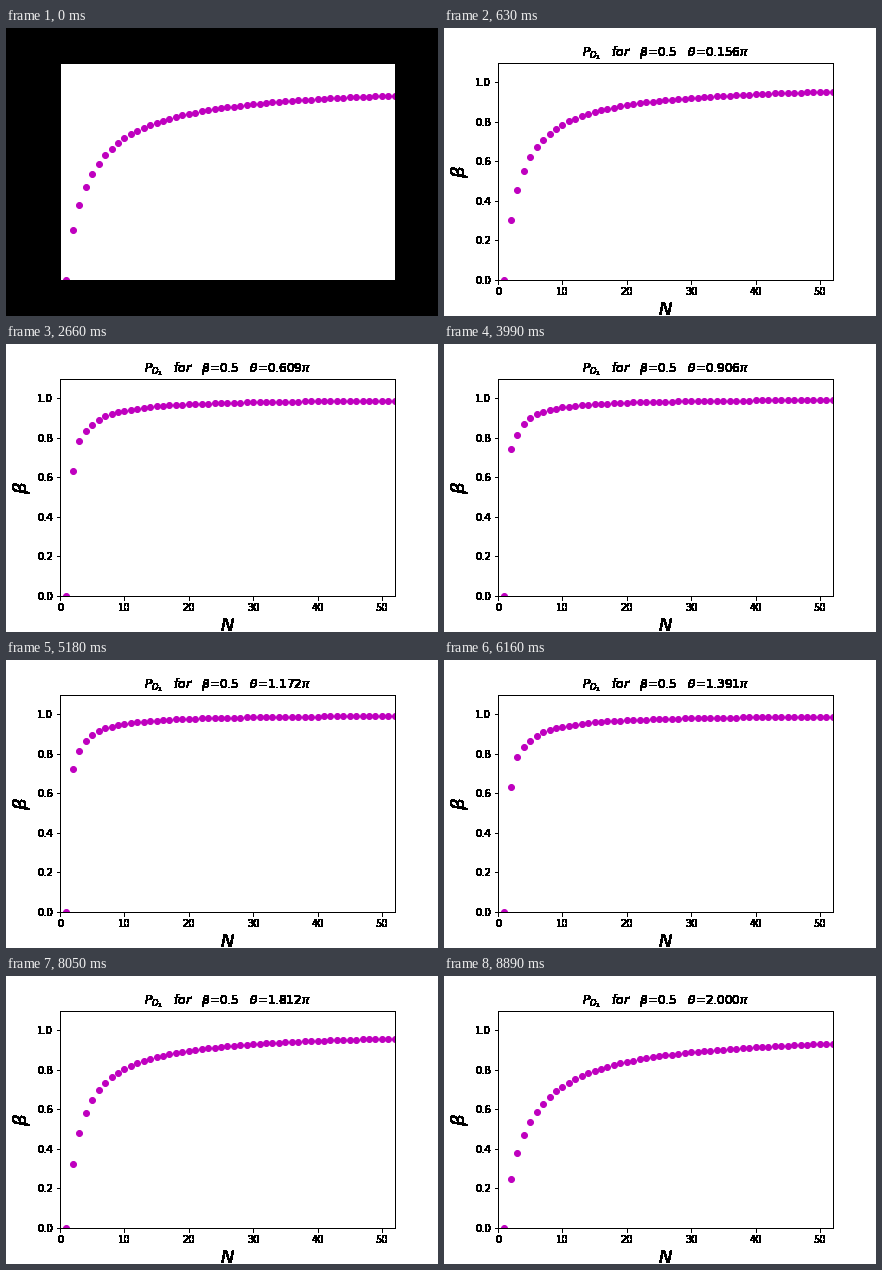
Animation, 432 px wide and 288 px high, one loop 8.96 s. Source, as a matplotlib script:

```python
import numpy as np
import matplotlib.pyplot as plt
from matplotlib.animation import FuncAnimation
from matplotlib.patches import Rectangle

FRAMES, INTERVAL = 128, 70
BETA = 0.5
STEPS = np.arange(1, 53)

plt.rcParams.update({"font.family": "DejaVu Sans", "mathtext.fontset": "dejavusans"})


def amplitude(n, theta):
    """Chain of n beam splitters with a lossy, phase-shifting object in one arm."""
    c, s = np.cos(np.pi / (2 * n)), np.sin(np.pi / (2 * n))
    tau = BETA * np.exp(1j * theta)
    cell = np.array([[c, -s], [tau * s, tau * c]])
    return abs(np.linalg.matrix_power(cell, n)[0, 0])


def harden(img, dpi):
    """Make every touched pixel fully opaque, for hard-edged lettering."""
    img = img.copy()
    img[..., 3] = img[..., 3] > 0
    return img, 0, 0


fig = plt.figure(figsize=(6, 4), dpi=72, facecolor="white")
backdrop = fig.add_artist(Rectangle((0, 0), 1, 1, transform=fig.transFigure,
                                    lw=0, color="white", zorder=-1))

ax = fig.add_axes([0.125, 0.125, 0.775, 0.755])
ax.set(xlim=(0, 52), ylim=(0, 1.1))
ax.set_xlabel("$N$", fontsize=18)
ax.set_ylabel(r"$\beta$", fontsize=18)
title = ax.set_title("", fontsize=12)
dots, = ax.plot([], [], "o", color="m")

for part in (ax.xaxis, ax.yaxis, title, *ax.spines.values()):
    part.set_agg_filter(harden)


def update(i):
    turn = (i + 1) / 64
    backdrop.set_color("black" if i == 0 else "white")
    dots.set_data(STEPS, [amplitude(n, turn * np.pi) for n in STEPS])
    title.set_text(rf"$P_{{D_1}}$   $for$   $\beta$={BETA}   $\theta$={turn:.3f}$\pi$")
    return backdrop, dots, title


anim = FuncAnimation(fig, update, frames=FRAMES, interval=INTERVAL,
                     repeat=True, repeat_delay=0, blit=False)
plt.show()
```
